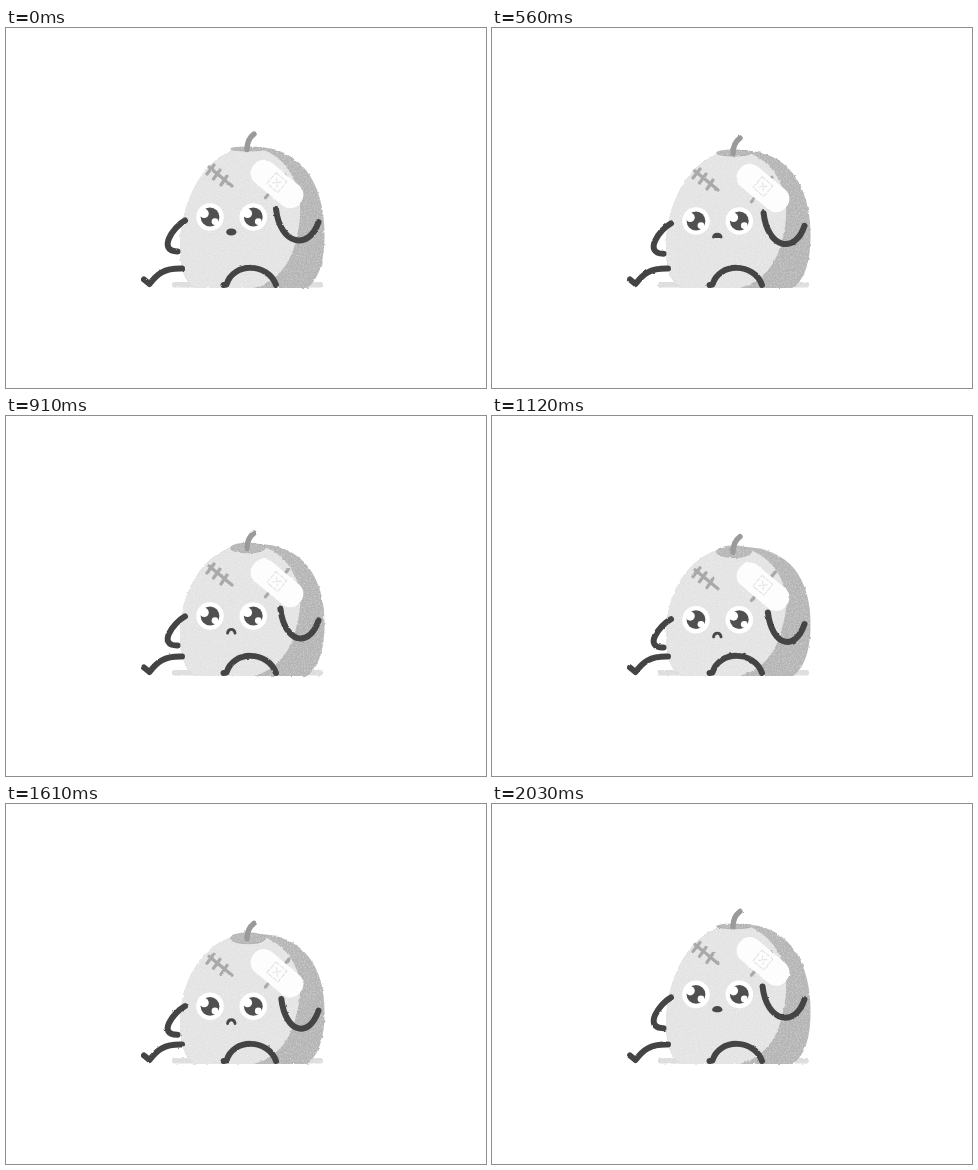
An HTML page that plays this animation: 480 px wide and 360 px high, repeating every 2.1 s.

```html
<!DOCTYPE html>
<html lang="en">
<head>
<meta charset="utf-8">
<title>Sad bruised fruit</title>
<style>
html, body { margin: 0; width: 100%; height: 100%; overflow: hidden; background: #fff; }
svg { display: block; width: 100vw; height: 100vh; }
.line { fill: none; stroke-linecap: round; stroke-linejoin: round; }
.limb { stroke: #444; stroke-width: 6; }
.scar { stroke: #a9a9a9; stroke-width: 3.2; }
</style>
</head>
<body>
<svg viewBox="0 0 480 360">
  <defs>
    <!-- Rough crayon edges, plus a pale grain inside the shapes -->
    <filter id="crayon" filterUnits="userSpaceOnUse" x="120" y="80" width="220" height="200" color-interpolation-filters="sRGB">
      <feTurbulence class="noise" type="fractalNoise" baseFrequency=".2" numOctaves="2" result="n"/>
      <feDisplacementMap in="SourceGraphic" in2="n" scale="2.6" xChannelSelector="R" yChannelSelector="G" result="rough"/>
      <feTurbulence class="noise" type="fractalNoise" baseFrequency=".7" numOctaves="2"/>
      <feColorMatrix values="0 0 0 0 1  0 0 0 0 1  0 0 0 0 1  .8 0 0 0 -.33"/>
      <feComposite in2="rough" operator="in" result="grain"/>
      <feMerge><feMergeNode in="rough"/><feMergeNode in="grain"/></feMerge>
    </filter>
    <filter id="ink" filterUnits="userSpaceOnUse" x="120" y="80" width="220" height="200" color-interpolation-filters="sRGB">
      <feTurbulence class="noise" type="fractalNoise" baseFrequency=".2" numOctaves="2" result="n"/>
      <feDisplacementMap in="SourceGraphic" in2="n" scale="2" xChannelSelector="R" yChannelSelector="G"/>
    </filter>
    <g id="eye">
      <circle r="13.8" fill="#fff"/>
      <circle r="9.4" fill="#505050"/>
      <circle cx="-5.8" cy="-3.6" r="4.6" fill="#fff"/>
      <circle cx="5" cy="4.6" r="3.4" fill="#fff"/>
    </g>
  </defs>
  <g filter="url(#crayon)">
    <rect x="166" y="254" width="151" height="5.5" rx="2" fill="#dcdcdc"/>
    <path id="shade" fill="#b4b4b4"/>
    <path id="light" fill="#e3e3e3"/>
    <ellipse id="cap" cx="242" rx="17.5" fill="#b5b5b5" stroke="#a8a8a8" stroke-width=".8"/>
  </g>
  <g filter="url(#ink)">
    <g class="nod">
      <path class="line" d="M241 121.5C241 113 244 109 248 106" stroke="#9a9a9a" stroke-width="5.4"/>
      <path class="line scar" d="M203 139L226 158M201 146L208 137M207.5 151L214 142M215 157L221 148"/>
      <g transform="translate(271 156) rotate(40)">
        <path id="wound" class="line scar"/>
        <rect x="-30" y="-13" width="60" height="26" rx="12" fill="#fdfdfd"/>
        <path class="line" d="M-8 -8H6V6H-8ZM-4 -4L2 2M2 -4L-4 2" stroke="#e5e5e5" stroke-width="1.2" stroke-dasharray="4 2"/>
      </g>
    </g>
  </g>
  <g class="nod">
    <use href="#eye" x="204" y="189"/>
    <use href="#eye" x="247.3" y="189"/>
    <path id="mouth" class="line" transform="translate(225.3 204.2)" style="fill:#484848" stroke="#484848" stroke-width="2.8"/>
  </g>
  <g class="line limb" filter="url(#ink)">
    <path id="armL"/>
    <path id="armR"/>
    <path d="M176 240.5C158 240 151 246 143.5 256L138 251.5"/>
    <path d="M270 257C262 234.5 227 234 220.5 256.5L217.5 257"/>
  </g>
</svg>
<script>
const LOOP = 2100, STEP = 70;
// [time, how far the head has sunk]
const keys = [[0, 0], [190, -3.2], [280, -3], [560, 4], [910, 11], [1330, 17], [1610, 13.3], [2030, 1.4]];
const $ = id => document.getElementById(id);
const all = name => document.querySelectorAll(name);
const path = (id, d) => $(id).setAttribute('d', d);

function key(i) {
  const n = keys.length, turn = Math.floor(i / n), [t, v] = keys[i - turn * n];
  return [t + turn * LOOP, v];
}

function slope(i) {
  const [a, u] = key(i - 1), [b, v] = key(i + 1);
  return (v - u) / (b - a);
}

// Smooth periodic curve through the keys
function sink(t) {
  let i = keys.length - 1;
  while (keys[i][0] > t) i--;
  const [a, u] = key(i), [b, v] = key(i + 1);
  const span = b - a, p = (t - a) / span, q = 1 - p;
  return u * q * q * (1 + 2 * p) + v * p * p * (3 - 2 * p)
    + span * p * q * (slope(i) * q - slope(i + 1) * p);
}

function draw(frame) {
  const d = sink(frame * STEP);
  const top = 119 + .8 * d;
  const left = `M190 260C178 254 174 240 174 218C174 183 194 ${top} 248 ${top}`;
  path('shade', `${left}C299 ${top} 318.5 ${160 + .3 * d} 318.5 208C318.5 233 313 251 301 260Z`);
  path('light', `${left}C285 ${top + 8} 302 ${165 + .6 * d} 291 208C286 232 275 252 248 260Z`);

  $('cap').setAttribute('cy', 121 + d);
  $('cap').setAttribute('ry', 2 + .26 * d);
  all('.nod').forEach(g => g.setAttribute('transform', `translate(0 ${d})`));
  path('wound', `M0 ${-12 - .5 * d}V18`);

  const open = Math.min(1, Math.max(0, 1 - d / 9)), droop = 2 * (1 - open);
  path('mouth', `M-3.8 ${droop}C-3 -3 3 -3 3.8 ${droop}C3 ${5.6 * open - 3} -3 ${5.6 * open - 3} -3.8 ${droop}Z`);

  path('armL', `M179 ${192.5 + .72 * d}C167 ${199 + .72 * d} 151 ${223 + .6 * d} 171.5 ${223.5 + .55 * d}`);
  const x = 270 + .4 * Math.max(0, d);
  path('armR', `M${x} ${181 + 1.05 * d}C${x + 4} ${217 + .9 * d} 303 ${223 + .9 * d} 312.5 ${194 + .95 * d}`);

  all('.noise').forEach(n => n.setAttribute('seed', frame + 1));
}

let last = -1;
function tick() {
  const frame = Math.floor(performance.now() % LOOP / STEP);
  if (frame !== last) draw(last = frame);
  requestAnimationFrame(tick);
}
tick();
</script>
</body>
</html>
```
